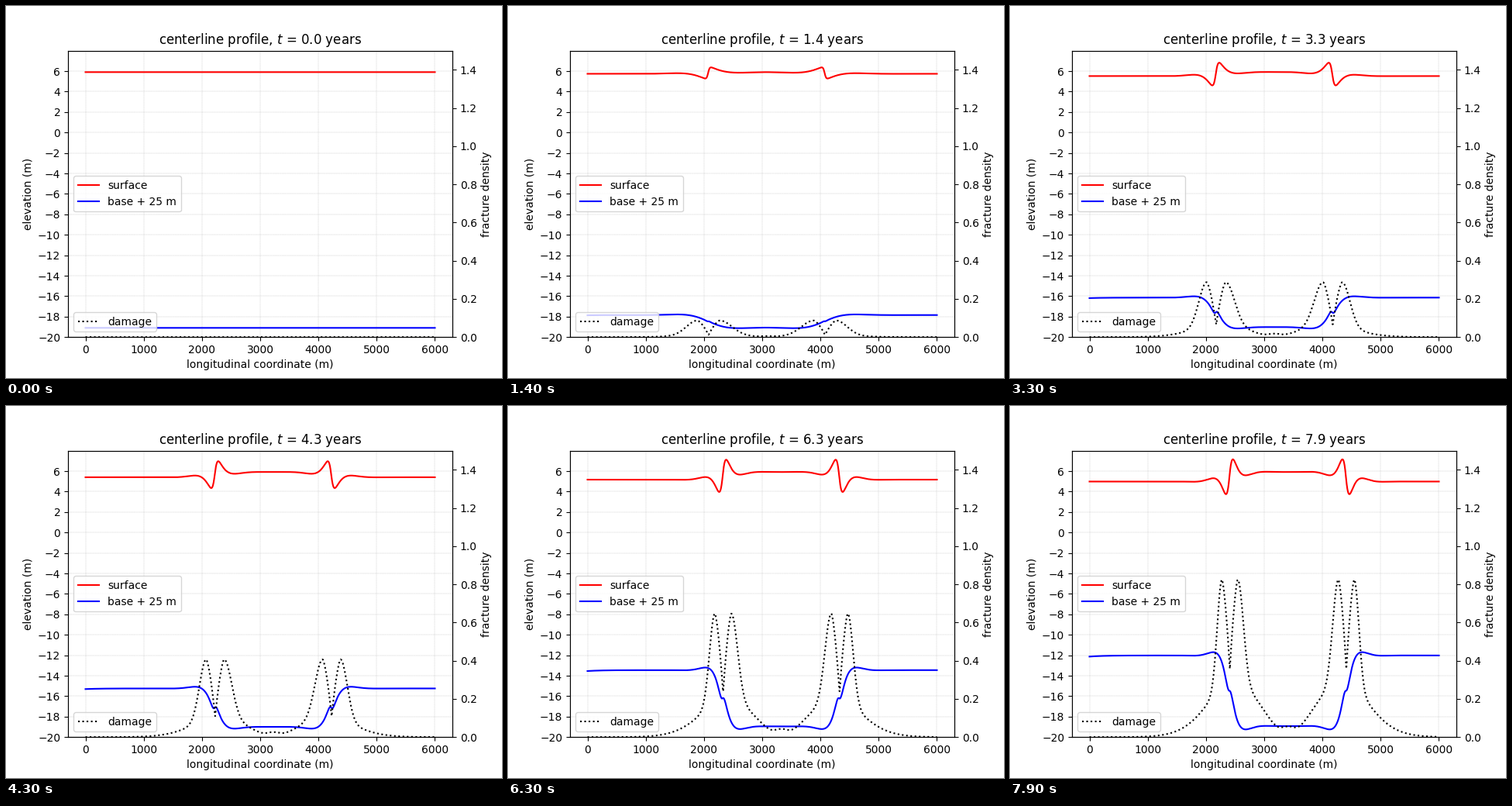
Recreate the animation shown at these times as a matplotlib script. Size 640 by 480 pixels, loop 8 s.

```python
import numpy as np
import matplotlib.pyplot as plt
from matplotlib.animation import FuncAnimation

FRAMES, INTERVAL = 80, 100
UNIT = 13.306          # metres per length unit of the local coordinate
HALF = 1000            # half width of the channel in metres
DRIFT = 51.0           # metres per year
x = np.linspace(0, 6000, 1801)


def local(t, shift=0.0):
    """Distance from the nearer margin, positive towards the middle."""
    return (HALF - np.abs(x - 3000 - DRIFT * t - shift)) / UNIT


def elevations(t):
    u = local(t)
    v = np.abs(u)
    age = max(t, 0.02)
    width = 5 * (1 - np.exp(-age / 2.5))
    decay = 10 + 26 * np.exp(-age / 1.4)
    wave = 18.8 * age ** -0.38

    # thinning outside the channel, floating, with bending at the margins
    inside = 0.5 * (1 + np.tanh(u / (1.05 * width)))
    thick = 25 - 1.0125 * t + 0.9925 * t * inside
    bend = np.tanh(u / width) * np.exp(-v / decay) * np.cos(v / wave)
    bend *= 1.45 * np.tanh(t / 4.2) / np.abs(bend).max()
    surface = 5.9 + 0.119 * (thick - 25) + 0.004 * t + bend
    base = surface - thick - 0.014 * t * np.exp(-x / 250)
    return surface, base


def damage(t):
    u = local(t, 7)
    v = np.abs(u)
    height = t ** 1.5 * (0.0557 - 0.00235 * t)
    peak = 9.5 + 7.5 * np.exp(-t / 3.3)
    spread = 2.7 * peak - 19 + 1.8 * (u > 0)
    trough = 0.07 + 0.046 * t
    share = 0.1 + 0.026 * t

    # notch between the twin peaks, flank and shoulder beyond them
    notch = 1 - (1 - trough) * np.clip(1 - v / peak, 0, 1) ** 1.5
    z = np.maximum(v - peak, 0)
    flank = np.exp(-(z / spread) ** 2)
    shoulder = np.where(u > 0, np.exp(-(z / 42) ** 2.5), np.exp(-(z / 36) ** 1.5))
    middle = 0.05 * np.exp(-((HALF / UNIT - u) / 10) ** 2)
    return height * (notch * ((1 - share) * flank + share * shoulder) + middle)


fig, ax = plt.subplots(figsize=(6.4, 4.8), dpi=100)
red, = ax.plot(x, x * 0, "r", lw=1.5, label="surface")
blue, = ax.plot(x, x * 0, "b", lw=1.5, label="base + 25 m")
ax.set_xlim(-300, 6300)
ax.set_ylim(-20, 8)
ax.set_yticks(range(-20, 8, 2))
ax.grid(linestyle="--", linewidth=0.25)
ax.set_xlabel("longitudinal coordinate (m)")
ax.set_ylabel("elevation (m)")
ax.legend(loc="center left")
title = ax.set_title("")

ax2 = ax.twinx()
dots, = ax2.plot(x, x * 0, "k:", lw=1.5, label="damage")
ax2.set_ylim(0, 1.5)
ax2.set_ylabel("fracture density")
ax2.legend(loc="lower left")


def update(i):
    t = i * INTERVAL / 1000
    surface, base = elevations(t)
    red.set_ydata(surface)
    blue.set_ydata(base)
    dots.set_ydata(damage(t))
    title.set_text(f"centerline profile, $t$ = {t:.1f} years")
    return red, blue, dots, title


anim = FuncAnimation(fig, update, frames=FRAMES, interval=INTERVAL,
                     repeat=True, repeat_delay=0)
plt.show()
```
